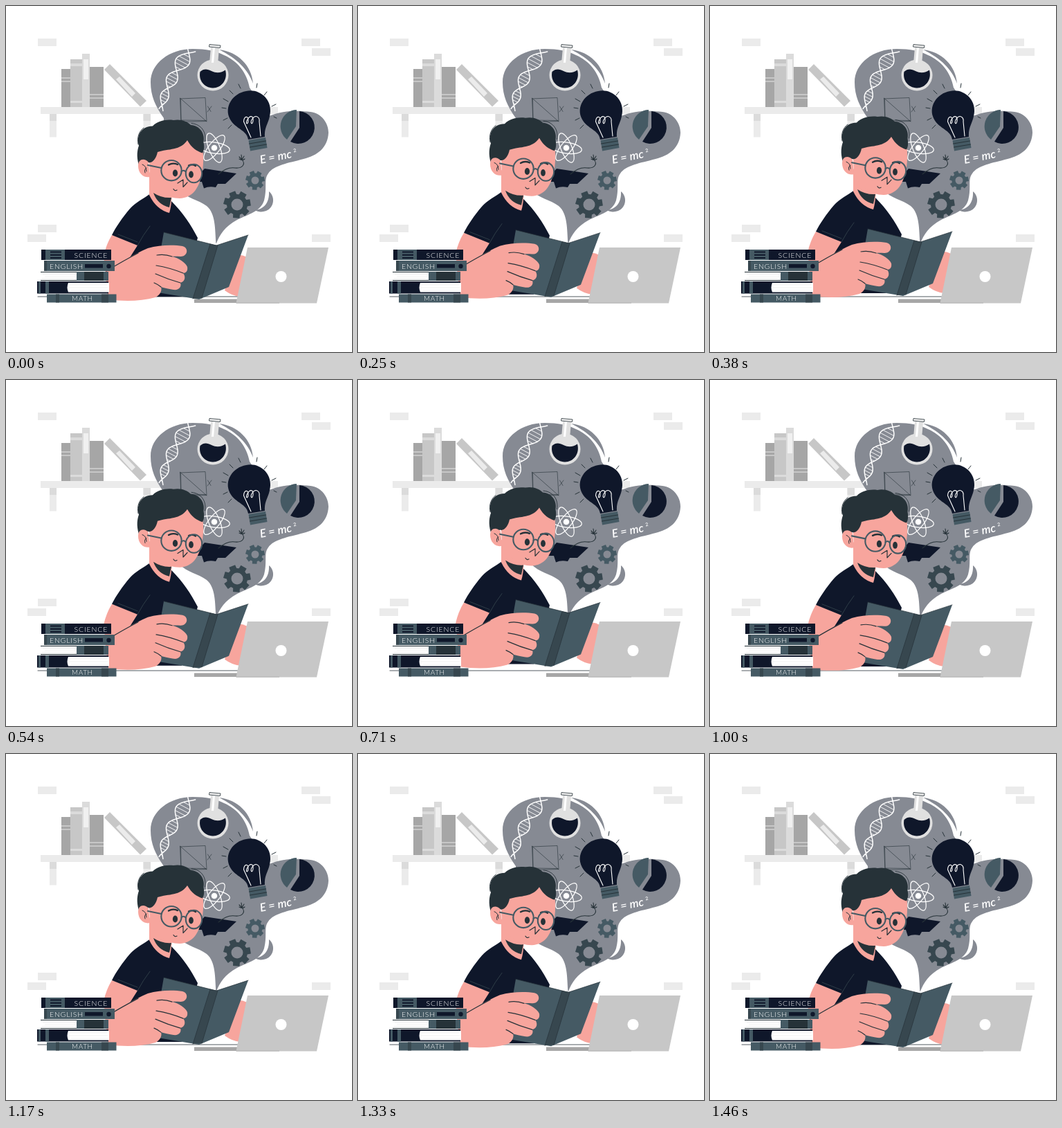
Recreate the animation shown at these times as an HTML page. Size 500x500 px, loop 1.5 s.

```html
<!DOCTYPE html>
<html lang="en">
<head>
<meta charset="utf-8">
<title>Student reading</title>
<style>
html, body { margin: 0; width: 100%; height: 100%; overflow: hidden; background: #fff; }
svg { display: block; width: 100vw; height: 100vh; }
text { font-family: Lato, "Open Sans", sans-serif; font-weight: 300; fill: #fff; }
.line { fill: none; stroke-linecap: round; stroke-linejoin: round; }
</style>
</head>
<body>
<svg viewBox="0 0 500 500">
  <!-- wall -->
  <path fill="#ebebeb" d="M46 47h27v11h-27zM427 47h27v11h-27zM442 61h27v11h-27zM46 316h27v11h-27zM31 330h27v11h-27zM442 330h27v11h-27z"/>
  <path fill="#ebebeb" d="M50 146H393V156H50zM63 156h10v33.500h-10zM198.500 156h10.500v33.500h-10.500z"/>
  <path fill="#dbdbdb" d="M63 156h10v10h-10zM198.500 156h10.500v10h-10.500z"/>
  <g>
    <path fill="#a6a6a6" d="M80 91h13v55h-13zM121 88h20v58h-20z"/>
    <path fill="#c7c7c7" d="M80 103h13v2h-13zM80 108h13v2h-13zM93 77h17v69h-17zM121 127h20v2h-20zM121 132h20v2h-20z"/>
    <path fill="#dbdbdb" d="M110 69h11v77h-11zM93 83h17v4h-17zM93 137h17v3h-17z"/>
    <path fill="#f0f0f0" d="M112 77h7v29h-7z"/>
    <path fill="#c7c7c7" d="M142 92L150 84L203 137L194 145.500z"/>
    <path fill="#ebebeb" d="M159 106L164 102L187 126L182 131z"/>
  </g>

  <!-- thought cloud -->
  <path fill="#868a93" d="M303.500 344C302 322 303 300 290 289C278 280 262 278 250 266L226 205L228 162C216 145 209 130 209 110C209 83 236 62 270 62C289 62 304 65 315 71C334 79 348 96 352 118L380 159C402 150 424 151 440 153C456 155 466 169 466 183C465 205 450 216 430 221C408 227 387 230 379 242C372 251 378 262 373 281C368 297 350 301 334 309C316 319 309 330 303.500 344z"/>
  <path fill="#868a93" d="M308 63C335 66 355 86 357 112C350 92 334 76 308 63z"/>
  <path fill="#868a93" d="M380 268C390 276 387 292 376 296C370 298 365 298 359 295C371 294 381 286 380 268z"/>
  <g id="dna" class="line" stroke="#fff"></g>

  <!-- flask -->
  <circle cx="299" cy="100" r="22.500" fill="#e0e0e0"/>
  <path fill="#e0e0e0" d="M296 60L308 61L306 84L294 83z"/>
  <path fill="#fff" d="M299 60L302 60L300 82L297 82z"/>
  <path fill="#ebebeb" stroke="#263238" stroke-width=".8" d="M294 55.500L310 57L309.500 60.500L293.500 59z"/>
  <path fill="#0f172a" d="M280.500 95C286 90 291 91 297 94C305 98 312 96 317 92.500C321 107 311 118.500 299 118.500C286 118 278 107 280.500 95z"/>

  <!-- geometry sketch -->
  <g class="line" stroke="#263238" stroke-width=".6">
    <path d="M251.500 134L288 132.500L290 166.500L253 167.500L251.500 133L290 167M252.500 135L253 165L289 165.500"/>
    <path d="M291.500 145L296 152.500M297 145L291 153M267 175.500L271 179M271 175.500L267 179"/>
  </g>

  <!-- atom -->
  <g class="line" stroke="#fff" stroke-width="1.200" transform="translate(301 205)">
    <ellipse rx="22.500" ry="8" transform="rotate(8)"/>
    <ellipse rx="22.500" ry="8" transform="rotate(68)"/>
    <ellipse rx="22.500" ry="8" transform="rotate(128)"/>
    <circle r="4.300" fill="#fff" stroke="none"/>
  </g>

  <!-- bulb -->
  <path fill="#0f172a" d="M347 123C366 119 383 134 382 152C381 169 373 173 374 189L350 193C348 179 332 178 324 164C314 146 328 126 347 123z"/>
  <path class="line" stroke="#fff" stroke-width="1.100" d="M354 190L343.500 167C344 159 350 158 350 165C350 173 345 170 349 164C353 157 358 159 357 166C356 173 352 169 356 163C361 156 367 161 366 167L368 188"/>
  <path fill="#455a64" d="M350.500 194L375 190L377.500 205L353 209.500z"/>
  <path class="line" stroke="#263238" stroke-width="1" d="M351.500 199L375.500 195M352.500 204L376.500 200"/>
  <path class="line" stroke="#263238" stroke-width="1" d="M312 147L318 148M314 134L321 138M323 122L328 127M336 113L339 119M363 112L362 118M377 124L373 129M390 142L384 145M314 165L320 162M321 177L326 172M387 160L391 162"/>

  <!-- pie chart -->
  <path fill="#0f172a" d="M424 152A23.500 23.500 0 1 1 411 196L424 176z"/>
  <path fill="#455a64" d="M420 150A24 24 0 0 0 406 193L419 174z"/>

  <g transform="rotate(-11 368 228)">
    <text x="368" y="228" font-size="16.500" font-style="italic" style="font-weight:600">E = mc</text>
    <text x="418" y="221" font-size="7" style="font-weight:600">2</text>
  </g>

  <!-- graduation cap -->
  <path fill="#0f172a" d="M269 254L287 235L333 242L317 257L306 257L303 262Q293 260 286 263.500L283 254z"/>
  <path class="line" stroke="#263238" stroke-width="1.100" d="M307 243Q320 232 331 234C341 235 347 229 341 222M341 222L337 218M341 222L340 215M341 222L344 217M337 221Q342 224 345 221"/>

  <path id="gearA" fill="#37474f" fill-rule="evenodd"/>
  <path id="gearB" fill="#455a64" fill-rule="evenodd"/>

  <!-- desk -->
  <path class="line" stroke="#263238" stroke-width=".8" d="M46 420H338"/>
  <path fill="#a6a6a6" d="M272 423.500H395V429H272z"/>

  <g id="body">
    <path fill="#f7a59d" d="M334 359Q343 360 351 364L338 420Q327 419 316 411z"/>
    <path fill="#f7a59d" d="M153 331Q145 344 141 361L145 395L181 374L194 345z"/>
    <path fill="#0f172a" d="M209 271C199 278 187 284 179 293C168 306 159 319 153 331L190 346L178 365L188 420H254L277 335C267 316 256 299 239 282z"/>
    <path class="line" stroke="#37474f" stroke-width=".8" d="M162 330L190 341M208 318Q198 331 190 346"/>

    <!-- neck, face and hair -->
    <path fill="#f7a59d" d="M207 240L207 273Q217 294 236 299Q239 290 240 270z"/>
    <path fill="#263238" d="M213 270Q225 278 239 277L236 291Q219 287 213 270z"/>
    <path fill="#f7a59d" d="M206 205L215 190L275 185L283 199C286 213 286 234 282 247C278 263 270 277 251 278C232 278 217 266 208 248z"/>
    <path fill="#263238" d="M192 230C188 217 190 207 192 202C188 187 195 174 212 173.500C219 166 231 163.500 242 165C253 163 262 167 267 172C280 173 288 184 285.500 197C287 204 286 209 284 212.500C276 210 268 205 262 194C252 209 235 206 219 211C217 221 211 228 205 226L198 232z"/>
    <path class="line" stroke="#263238" stroke-width=".9" d="M268 169.500C283 171 290 183 287.500 196M191 200C189 190 192 181 199 176"/>
  </g>

  <g id="features">
    <path fill="#f7a59d" d="M206 226C200 219 191 221 191 231C191 242 199 249 208 247z"/>
    <path class="line" stroke="#263238" stroke-width="1" d="M197 229Q203 231 203 239M203 234Q199 236 201 241"/>
    <g fill="#263238">
      <ellipse cx="244.500" cy="241.500" rx="3.600" ry="5"/>
      <ellipse cx="267.500" cy="243.500" rx="3.400" ry="5"/>
    </g>
    <path class="line" stroke="#263238" stroke-width="2.400" d="M235 229.500Q241 226 248 229M264 230.500Q269 228 274 231"/>
    <g class="line" stroke="#455a64" stroke-width="2.100">
      <circle cx="239" cy="237.700" r="14.700"/>
      <ellipse cx="271.500" cy="242" rx="11.700" ry="13.300"/>
      <path d="M253.500 239Q257 236 260 240M224.500 234L205 230"/>
    </g>
    <path class="line" stroke="#263238" stroke-width="1.200" d="M248 256L256 251L256 261.500L262 255M242 264.500Q244 268 247 266"/>
  </g>

  <g id="reading">
    <!-- open book -->
    <path fill="#455a64" d="M228 327L304 346L350 331L322 406L279 424L213 413z"/>
    <path fill="#37474f" d="M295 344L306 346L283 422L270 423z"/>
    <path class="line" stroke="#263238" stroke-width=".7" d="M228 327L304 346L350 331M306 346L283 422M295 344L270 423"/>

    <!-- near hand -->
    <path fill="#f7a59d" d="M143 384C163 372 184 359 205 350C222 345 243 345 255 347C263 349 263 358 257 361C252 363 247 361 240 362C249 364 260 371 262 377C263 383 260 386 256 386C260 391 259 398 252 400C254 406 250 411 242 410C234 409 228 407 224 406C226 412 222 418 216 421C195 427 169 427 148 424z"/>
    <path class="line" stroke="#263238" stroke-width="1.200" d="M145 383Q170 368 191 357M240 362Q229 358 218 360M256 386Q236 378 217 375M252 400Q234 395 216 387M224 406Q219 402 214 400"/>
  </g>

  <!-- book stack -->
  <g>
    <path fill="#0f172a" d="M51 352H152V367H51z"/>
    <path fill="#455a64" d="M57 352H85V367H57z"/>
    <path stroke="#0f172a" stroke-width="2" d="M64 355.500H80M64 359.700H80M64 364H80"/>
    <text x="98.500" y="364" font-size="10.500" letter-spacing=".85">SCIENCE</text>

    <path fill="#455a64" d="M55 368H157V383H55z"/>
    <path fill="#37474f" d="M55 368H59V383H55z"/>
    <path fill="#0f172a" d="M114 373H140V378.500H114z"/>
    <circle cx="148.500" cy="376" r="3.200" fill="#0f172a"/>
    <text x="63" y="379.500" font-size="10.500" letter-spacing=".8">ENGLISH</text>

    <path fill="#263238" d="M50 384H148V397H50z"/>
    <path fill="#fff" d="M50 385H102V396H50z"/>
    <path fill="#455a64" d="M102 384H113V397H102zM141 384H148V397H141z"/>
    <path stroke="#e0e0e0" stroke-width=".5" d="M53 388H100M56 391H101M52 393.500H98"/>

    <path fill="#0f172a" d="M45 398H148V415.500H45z"/>
    <path fill="#fff" d="M90 400H149V413.500H90Q87 407 90 400z"/>
    <path fill="#455a64" d="M47 398H50V415.500H47zM57 398H62V415.500H57z"/>
    <path stroke="#e0e0e0" stroke-width=".5" d="M92 403H146M90 407H147M94 411H148"/>

    <path fill="#455a64" d="M59 416.500H159.500V428.500H59z"/>
    <path fill="#37474f" d="M72 416.500H77V428.500H72zM138 416.500H148V428.500H138z"/>
    <text x="95" y="426" font-size="10" letter-spacing=".6">MATH</text>
  </g>

  <!-- laptop -->
  <path fill="#c7c7c7" d="M349 349H466L449 429.500H332.500z"/>
  <path fill="#a6a6a6" d="M332.500 428.700H395V429.500H332.500z"/>
  <circle cx="397.500" cy="391" r="8" fill="#fff"/>
</svg>
<script>
const LOOP = 1500, STEPS = 36;
const RISE = { body: 9.7, features: 7.4, reading: 9.7 };
const $ = id => document.getElementById(id);
const num = v => v.toFixed(1);

function gear(id, cx, cy, outer, inner, hole) {
  const teeth = 7, pts = [];
  for (let i = 0; i < teeth; i++) {
    [[-.33, inner], [-.24, outer], [.24, outer], [.33, inner]].forEach(([off, r]) => {
      const a = i * 2 * Math.PI / teeth + off - .16;
      pts.push(num(cx + r * Math.cos(a)) + " " + num(cy + r * Math.sin(a)));
    });
  }
  $(id).setAttribute("d", `M${pts.join("L")}zM${cx - hole} ${cy}a${hole} ${hole} 0 1 0 ${2 * hole} 0a${hole} ${hole} 0 1 0 ${-2 * hole} 0z`);
}

// Point on one strand of the helix; u runs from bottom to top
function strand(u, side) {
  const bend = (a, b, c) => (1 - u) ** 2 * a + 2 * u * (1 - u) * b + u * u * c;
  const w = side * (4.5 + 7 * u) * Math.sin(Math.PI * (u - .075) / .29);
  return [bend(224, 232, 268) + w * .88, bend(150, 108, 63) + w * .46].map(num).join(" ");
}

function drawDna() {
  const path = side => "M" + Array.from({ length: 41 }, (_, i) => strand(i / 40, side)).join("L");
  let rungs = "";
  for (let i = 1; i < 20; i++) rungs += `M${strand(i / 20, 1)}L${strand(i / 20, -1)}`;
  $("dna").innerHTML = `<path stroke-width="1.5" d="${path(1)}${path(-1)}"/><path stroke-width=".9" d="${rungs}"/>`;
}

// The reader rises and sinks at a steady pace, 24 poses a second
function draw(t) {
  const last = STEPS - 1;
  const k = Math.floor((t % LOOP + 5) / (LOOP / STEPS)) % STEPS;
  const lift = 1 - Math.abs(2 * k / last - 1);
  for (const id in RISE) $(id).setAttribute("transform", `translate(0 ${(-RISE[id] * lift).toFixed(2)})`);
}

gear("gearA", 334, 287, 20, 15, 8.5);
gear("gearB", 360, 252, 14, 10.5, 5.5);
drawDna();
const start = performance.now();
function tick() {
  draw(performance.now() - start);
  requestAnimationFrame(tick);
}
draw(0);
requestAnimationFrame(tick);
</script>
</body>
</html>
```
